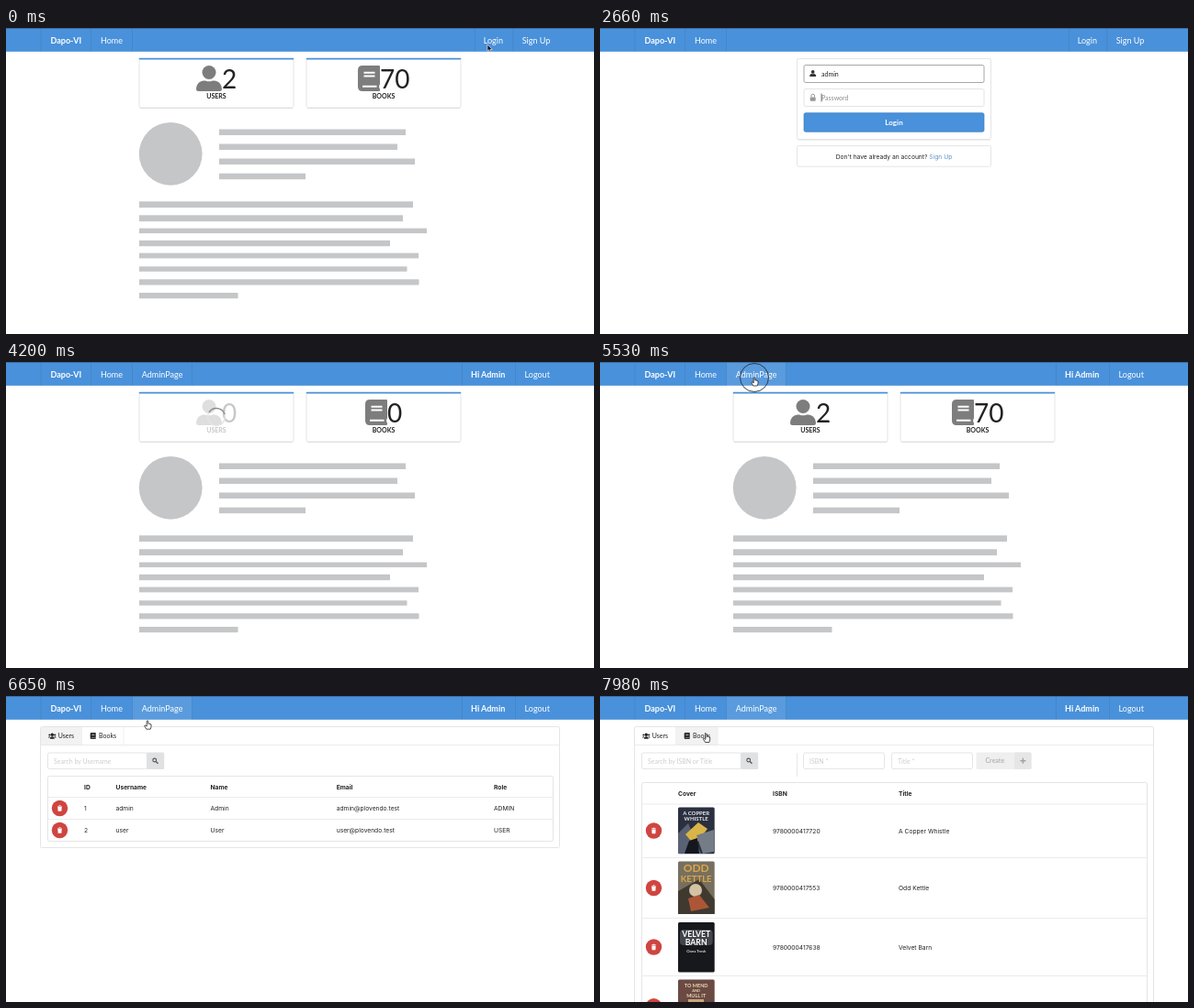
Recreate the animation shown at these times as an HTML page. Size 640 px wide and 334 px high, loop 8 s.

```html
<!DOCTYPE html>
<html lang="en">
<head>
<meta charset="utf-8">
<title>Library admin demo</title>
<style>
  html, body { margin: 0; width: 100%; height: 100%; overflow: hidden; background: #fff; }
  svg { display: block; width: 100%; height: 100%; }
  text { font: 7px Lato, sans-serif; fill: #222; white-space: pre; }
  .nav { font-size: 9.02px; fill: #fff; }
  .body { font-family: Inter, sans-serif; font-size: 6.7px; }
  .bold { font-weight: 700; }
  .mid { text-anchor: middle; }
  .stat { font-size: 28px; }
  .hint { fill: #cdcdcd; }
</style>
</head>
<body>
<svg id="stage" viewBox="0 0 640 334" xmlns="http://www.w3.org/2000/svg"></svg>
<script>
const LOOP = 8000, STEP = 70;
const BLUE = '#4991da', RED = '#cf4540', LINE = '#dedfe0', GREY = '#c5c6c8', ICON = '#7d7d7d';

// Markup helpers
const rect = (x, y, w, h, fill, extra = '') =>
  `<rect x="${x}" y="${y}" width="${w}" height="${h}" fill="${fill}" ${extra}/>`;
const frame = (x, y, w, h, extra = '') =>
  rect(x, y, w, h, '#fff', `rx="1.8" stroke="${LINE}" stroke-width=".8" ${extra}`);
const text = (x, y, value, cls = '', extra = '') =>
  `<text x="${x}" y="${y}" class="${cls}" ${extra}>${value}</text>`;
const path = (d, stroke, width = .8, extra = '') =>
  `<path d="${d}" fill="none" stroke="${stroke}" stroke-width="${width}" ${extra}/>`;
const group = (id, content, extra = '') => `<g id="${id}" ${extra}>${content}</g>`;
const use = (id, x, y, scale, fill) =>
  `<use href="#${id}" transform="translate(${x} ${y}) scale(${scale})" fill="${fill}"/>`;
const divider = x => rect(x, 0, .8, 26, '#222', 'opacity=".1"');
const hover = (id, x, w) => rect(x, 0, w, 26, '#fff', `id="${id}" opacity=".09"`);
const hline = (x1, x2, y) => path(`M${x1} ${y}H${x2}`, '#e6e6e7');

const defs = `<defs>
  <g id="user"><circle cx="14" cy="7.5" r="7.5"/>
    <path d="M0 26C0 20 4 16.4 8.4 16.4H10q4 1.8 8 0h1.600C24 16.400 28 20 28 26q0 2-2.400 2H2.400Q0 28 0 26Z"/></g>
  <g id="book"><path d="M5 0H23q1 0 1 1V20q0 1-.8 1.500v3q.8.3.8 1V27q0 1-1 1H5q-5 0-5-5V5Q0 0 5 0Z"/>
    <path d="M6.500 7.800H18.500M6.500 11.500H18.500M5 22.800H20.500" fill="none" stroke="#fff" stroke-width="1.9"/></g>
  <g id="people"><circle cx="4.300" cy="1.700" r="1.700"/><circle cx="1.400" cy="2" r="1.100"/><circle cx="7.200" cy="2" r="1.100"/>
    <path d="M1.800 6.200Q1.800 3.700 4.300 3.700T6.800 6.200ZM0 5Q0 3.400 2 3.500L1.400 5ZM8.600 5Q8.600 3.400 6.600 3.500L7.200 5Z"/></g>
  <g id="lens"><circle cx="2.500" cy="2.500" r="1.900" fill="none" stroke="#555" stroke-width="1.100"/>
    <path d="M4 4L6.300 6.300" stroke="#555" stroke-width="1.300"/></g>
  <g id="remove"><circle r="8.700" fill="${RED}"/>
    <path d="M-2.600-2.600H2.600V-1.900H-2.600ZM-.9-3.200H.9V-2.600H-.9ZM-2.200-1.400H2.200L1.900 3.200H-1.900Z" fill="#fff"/></g>
</defs>`;

const card = (x, label) => frame(x, 33.5, 168, 53.500) +
  rect(x + 1, 87.200, 166, .8, '#ddd') + rect(x - .4, 32.800, 168.800, 1.600, BLUE, 'rx=".8"') +
  text(x + 84, 76.800, label, 'bold mid');

// Each bar: left, top, right, height
const bars = [
  [232, 110.5, 435, 6.5], [232, 126.5, 426, 6.5], [232, 142.5, 445, 6.5], [232, 158.700, 326, 6.5],
  [145, 189.300, 443, 6.800], [145, 204.300, 432, 6.800], [145, 218.600, 458, 5.500], [145, 231.800, 418, 6.400],
  [145, 245.600, 449, 5.800], [145, 260.300, 436.5, 5.500], [145, 274.300, 449.5, 6.200], [145, 289, 252.5, 6.200]
];

const home = group('home',
  card(145, 'USERS') + use('user', 207, 41, 1, ICON) + text(235, 65.700, '2', 'stat', 'id="userCount"') +
  card(327, 'BOOKS') +
  group('bookStat', use('book', 383, 41, 1, ICON) + text(407, 65.700, '70', 'stat', 'id="bookCount"')) +
  group('loader', rect(146, 35, 166, 51, '#fff', 'opacity=".75"') +
    `<circle cx="229" cy="60" r="9.500" fill="none" stroke="#e4e4e4" stroke-width="1.400"/>` +
    path('M221 55A9.500 9.500 0 0 1 238 57', '#8a8a8a', 1.4)) +
  `<circle cx="179.200" cy="137.300" r="34.400" fill="${GREY}"/>` +
  bars.map(([x, y, right, h]) => rect(x, y, right - x, h, GREY)).join(''));

const login = group('login',
  frame(214.5, 33.5, 211, 88) + rect(215.5, 121.700, 209, .8, '#ddd') +
  frame(222, 40.5, 196, 19, 'id="nameBox"') + use('user', 228.200, 46, .25, '#333') +
  text(241, 52.800, '', '', 'id="nameText"') +
  frame(222, 66.5, 196, 19, 'id="passBox"') +
  group('lock', rect(228.700, 75.400, 6, 4.300, '#333', 'rx=".7"') +
    path('M229.900 75.400V74a1.800 1.800 0 0 1 3.600 0V75.400', '#333', 1)) +
  text(241, 78.800, 'Password', '', 'id="passText"') + group('dots', '') +
  rect(241, 45.5, .7, 9, '#333', 'id="caret"') +
  rect(222, 92.700, 196, 20.600, BLUE, 'rx="1.800" stroke="#3c7fc4" stroke-width=".7"') +
  text(320, 106, 'Login', 'bold mid', 'style="font-size:8px;fill:#fff"') +
  frame(214.5, 128.5, 211, 22.700) +
  text(320, 142.600, 'Don\'t have already an account? <tspan fill="#5a8fc4">Sign Up</tspan>', 'body mid'));

const tabs = frame(37.5, 33.5, 565, 320, 'id="pane"') +
  rect(38, 34, 44.5, 19.5, '#f2f2f2', 'id="usersTab"') + rect(82.900, 34, 45, 19.5, '#f2f2f2', 'id="booksTab"') +
  path('M82.500 34V53.500M128 34V53.500', '#ececec') + hline(37.5, 602.5, 53.5) +
  use('people', 46, 40.5, 1, '#222') + text(56.800, 46.300, 'Users') +
  use('book', 91.700, 40, .25, '#222') + text(101, 46.300, 'Books');
const search = hint => frame(45.5, 62, 108, 17.5) + text(52, 73.500, hint, 'hint') +
  rect(153, 61.600, 19.200, 18.300, '#e0e1e2', 'rx="1.500"') + use('lens', 159.200, 67.500, 1, '');
const removeAt = y => use('remove', 58.5, y, 1, '');
const cells = (xs, y, values, cls = 'body') => values.map((v, i) => text(xs[i], y, v, cls)).join('');

const userCols = [85, 119.5, 222.5, 359.700, 531];
const users = group('users', search('Search by Username') + frame(45.5, 87.5, 550, 71) +
  cells(userCols, 101.5, ['ID', 'Username', 'Name', 'Email', 'Role'], 'body bold') +
  hline(45.5, 595.5, 110.5) + hline(45.5, 595.5, 134.5) + removeAt(122.5) + removeAt(146.5) +
  cells(userCols, 125, ['1', 'admin', 'Admin', 'admin@plovendo.test', 'ADMIN']) +
  cells(userCols, 149, ['2', 'user', 'User', 'user@plovendo.test', 'USER']));

const coverText = (y, value, size, fill) =>
  text(104.700, y, value, 'bold mid', `style="font-size:${size}px;fill:${fill}"`);
const poly = (points, fill) => `<polygon points="${points}" fill="${fill}"/>`;
const covers = group('covers',
  rect(85, 121.5, 39.700, 50.800, '#2a3040', 'rx="1.500"') +
  poly('85,150 96,139 110,172 85,172', '#596273') + poly('93,151 107,138 117,145 103,163', '#d9b548') +
  poly('105,152 124,146 124,170 112,172', '#747c88') + poly('97,158 106,155 108,172 92,172', '#15171f') +
  coverText(130, 'A COPPER', 6, '#eee') + coverText(136.300, 'WHISTLE', 6, '#eee') +
  rect(85, 180.5, 39.700, 57.5, '#77705f', 'rx="1.500"') + poly('85,213 108,200 124.700,222 124.700,238 85,238', '#3f3930') +
  `<circle cx="104" cy="212" r="7" fill="#d2c3a4"/>` + poly('96,221 108,217 119,231 99,235', '#ad5637') +
  coverText(192, 'ODD', 12, '#dda548') + coverText(202.5, 'KETTLE', 9.5, '#dda548') +
  rect(85, 247, 39.700, 54.5, '#17181c', 'rx="1.500"') +
  rect(87, 255, 35.700, 17, '#6f737a', 'rx="4" opacity=".5"') +
  coverText(263, 'VELVET', 8.700, '#fff') + coverText(271.5, 'BARN', 8.700, '#fff') +
  coverText(280, 'Oona Tresk', 4.200, '#ddd') +
  rect(85, 309.5, 39.700, 30, '#6a4a42', 'rx="1.500"') +
  coverText(317.5, 'TO MEND', 5.500, '#ead9b8') + coverText(322.800, 'AND', 4, '#ead9b8') +
  coverText(328.800, 'MULL IT', 5.500, '#ead9b8') + rect(96, 331, 17, 4, '#c9a882'));

const bookCols = [85, 188, 325];
const bookRows = [
  [147, '9780000417720', 'A Copper Whistle'],
  [209.5, '9780000417553', 'Odd Kettle'],
  [274, '9780000417638', 'Velvet Barn']
];
const books = group('books', search('Search by ISBN or Title') +
  path('M214.500 62V88', '#e2e2e2') +
  frame(221.5, 62, 88, 17.5) + text(228, 73.5, 'ISBN *', 'hint') +
  frame(317.5, 62, 88, 17.5) + text(324, 73.5, 'Title *', 'hint') +
  rect(409.5, 61.600, 60, 18.300, '#efefef', 'rx="1.500"') + rect(451, 61.600, 18.5, 18.300, '#e6e6e7', 'rx="1.500"') +
  text(419.5, 73.300, 'Create', 'bold', 'style="fill:#b4b4b4"') +
  path('M457.400 70.700H463.400M460.400 67.700V73.700', '#a2a2a2', 1.4) +
  frame(45.5, 94.5, 550, 260) + cells(bookCols, 108.5, ['Cover', 'ISBN', 'Title'], 'body bold') +
  [118, 176.5, 242.5, 305.5].map(y => hline(45.5, 595.5, y)).join('') +
  bookRows.map(([y, ...values]) => removeAt(y) + cells(bookCols.slice(1), y + 2.500, values)).join('') +
  removeAt(338.700) + covers);

const nav = rect(0, 0, 640, 25.800, BLUE) +
  hover('loginHover', 510.3, 41) + hover('adminHover', 137.600, 64.800) +
  [37.5, 92.200, 137].map(divider).join('') +
  text(48.5, 17, 'Dapo-VI', 'nav bold') + text(103, 17, 'Home', 'nav') +
  group('guest', divider(510) + divider(551.5) + text(519.700, 17, 'Login', 'nav') + text(561.700, 17, 'Sign Up', 'nav')) +
  group('member', [202, 496, 554].map(divider).join('') + text(147.700, 17, 'AdminPage', 'nav') +
    text(506, 17, 'Hi Admin', 'nav bold') + text(564.5, 17, 'Logout', 'nav')) +
  rect(0, 0, 640, .7, '#3b5f8c');

const pointer = group('pointer',
  `<path id="arrow" d="M0 0V7.300L1.700 5.800 2.800 8.300 4 7.800 2.900 5.400H5.200Z" fill="#111" stroke="#fff" stroke-width=".6"/>` +
  `<path id="hand" d="M-.8.6Q0-.5.8.6V3.600L1.800 3.400 3 3.900 4 4.300V7L3.200 9.500H-1.200L-3.300 6Q-3.200 4.800-2 5.400L-.8 6.500Z" fill="#fff" stroke="#222" stroke-width=".8" stroke-linejoin="round"/>` +
  path('M-1.200 0H1.200M0 0V7M-1.200 7H1.200', '#333', .7, 'id="beam"'));

const stage = document.getElementById('stage');
stage.innerHTML = defs + rect(0, 0, 640, 334, '#fff') + home + login + group('admin', tabs + users + books) + nav +
  `<circle id="ring" fill="none" stroke="#2b2f36" stroke-width=".9"/>` + pointer;
const el = {};
stage.querySelectorAll('[id]').forEach(node => el[node.id] = node);

// Pointer path: time, x, y, shape from that time on
const route = [
  [0, 524, 18, 'arrow'], [140, 525, 17.5, 'arrow'], [280, 524.5, 17, 'arrow'], [420, 524.5, 17, 'arrow'],
  [490, 529.7, 15.5, 'hand'], [1120, 529.7, 15.5, 'hand'], [1190, 496, 27, 'arrow'], [1400, 384, 51, 'beam'],
  [1890, 384, 51, ''], [4690, 384, 57, ''], [4760, 378, 57, 'arrow'], [4900, 178, 53, 'arrow'],
  [5040, 178, 53, 'arrow'], [5320, 169, 20, 'hand'], [5460, 168, 16.5, 'hand'], [5740, 168, 16.5, 'hand'],
  [6510, 160, 22, 'hand'], [6650, 154, 26.7, 'hand'], [6720, 148, 30, 'arrow'], [7070, 118, 40, 'hand'],
  [7140, 115.700, 41, 'hand'], [8000, 115.700, 41, 'hand']
];
const clicks = [[630, 770], [5460, 5740], [7630, 7770]];
const nameKeys = [1890, 2030, 2170, 2310, 2450];
const passKeys = [2940, 3010, 3080, 3220, 3360];

const clamp = v => Math.max(0, Math.min(1, v));
const show = (node, on) => node.style.display = on ? '' : 'none';
const grey = (from, to, k) => {
  const v = Math.round(from + (to - from) * k);
  return `rgb(${v},${v},${v})`;
};
const countBefore = (times, t) => times.filter(k => t >= k).length;

function pointerAt(t) {
  const i = Math.max(0, route.findIndex(key => key[0] > t) - 1);
  const [t0, x0, y0, shape] = route[i], [t1, x1, y1] = route[i + 1];
  const k = (t - t0) / (t1 - t0);
  return { x: x0 + (x1 - x0) * k, y: y0 + (y1 - y0) * k, shape };
}

function drawLogin(t) {
  const typed = countBefore(nameKeys, t), secret = countBefore(passKeys, t);
  const inPass = t >= 2660, k = clamp((t - 2660) / 140);
  el.nameText.textContent = typed ? 'admin'.slice(0, typed) : 'Username';
  el.nameText.style.fill = typed ? '#222' : '#8c8c8c';
  el.nameBox.setAttribute('stroke', grey(145, 222, k));
  el.passBox.setAttribute('stroke', grey(222, 145, k));
  el.passText.style.fill = inPass ? '#8c8c8c' : '#d2d2d2';
  el.lock.setAttribute('opacity', .5 + .5 * k);
  show(el.passText, !secret);
  el.dots.innerHTML = Array.from({ length: secret }, (_, i) =>
    `<circle cx="${243 + i * 4.2}" cy="76.300" r="1.400" fill="#222"/>`).join('');
  const width = inPass ? secret * 4.2 : typed ? el.nameText.getComputedTextLength() : 0;
  el.caret.setAttribute('x', 240.7 + width);
  el.caret.setAttribute('y', inPass ? 71.5 : 45.5);
  show(el.caret, t < 1400 || (t >= 1890 && t < 3920));
}

function drawHome(t) {
  const loading = t >= 4200 && t < 4270;
  el.userCount.textContent = loading ? '0' : '2';
  el.bookCount.textContent = loading ? '0' : '70';
  el.bookStat.setAttribute('transform', `translate(${loading ? 8 : 0} 0)`);
  show(el.loader, loading);
}

function drawAdmin(t) {
  const onBooks = t >= 7770;
  show(el.users, !onBooks);
  show(el.books, onBooks);
  show(el.covers, t >= 7910);
  show(el.usersTab, !onBooks);
  show(el.booksTab, t >= 7070);
  el.pane.setAttribute('height', onBooks ? 320 : 132);
}

function draw(time) {
  const t = Math.floor(time % LOOP / STEP) * STEP;
  const onLogin = t >= 980 && t < 4200, onAdmin = t >= 5740, member = t >= 4200;
  show(el.home, !onLogin && !onAdmin);
  show(el.login, onLogin);
  show(el.admin, onAdmin);
  show(el.guest, !member);
  show(el.member, member);
  show(el.loginHover, t >= 630 && t < 1190);
  show(el.adminHover, t >= 5320);
  if (onLogin) drawLogin(t);
  else if (onAdmin) drawAdmin(t);
  else drawHome(t);

  const { x, y, shape } = pointerAt(t);
  el.pointer.setAttribute('transform', `translate(${x} ${y})`);
  for (const name of ['arrow', 'hand', 'beam']) show(el[name], shape === name);

  const click = clicks.find(([from, to]) => t >= from && t < to);
  show(el.ring, click);
  if (click) {
    const k = clamp((t - click[0] + STEP) / (2 * STEP));
    el.ring.setAttribute('cx', x);
    el.ring.setAttribute('cy', y + .5);
    el.ring.setAttribute('r', 13 + 2.5 * k);
    el.ring.setAttribute('opacity', k);
  }
}

const start = performance.now();
function tick() {
  draw(performance.now() - start);
  requestAnimationFrame(tick);
}
tick();
</script>
</body>
</html>
```
